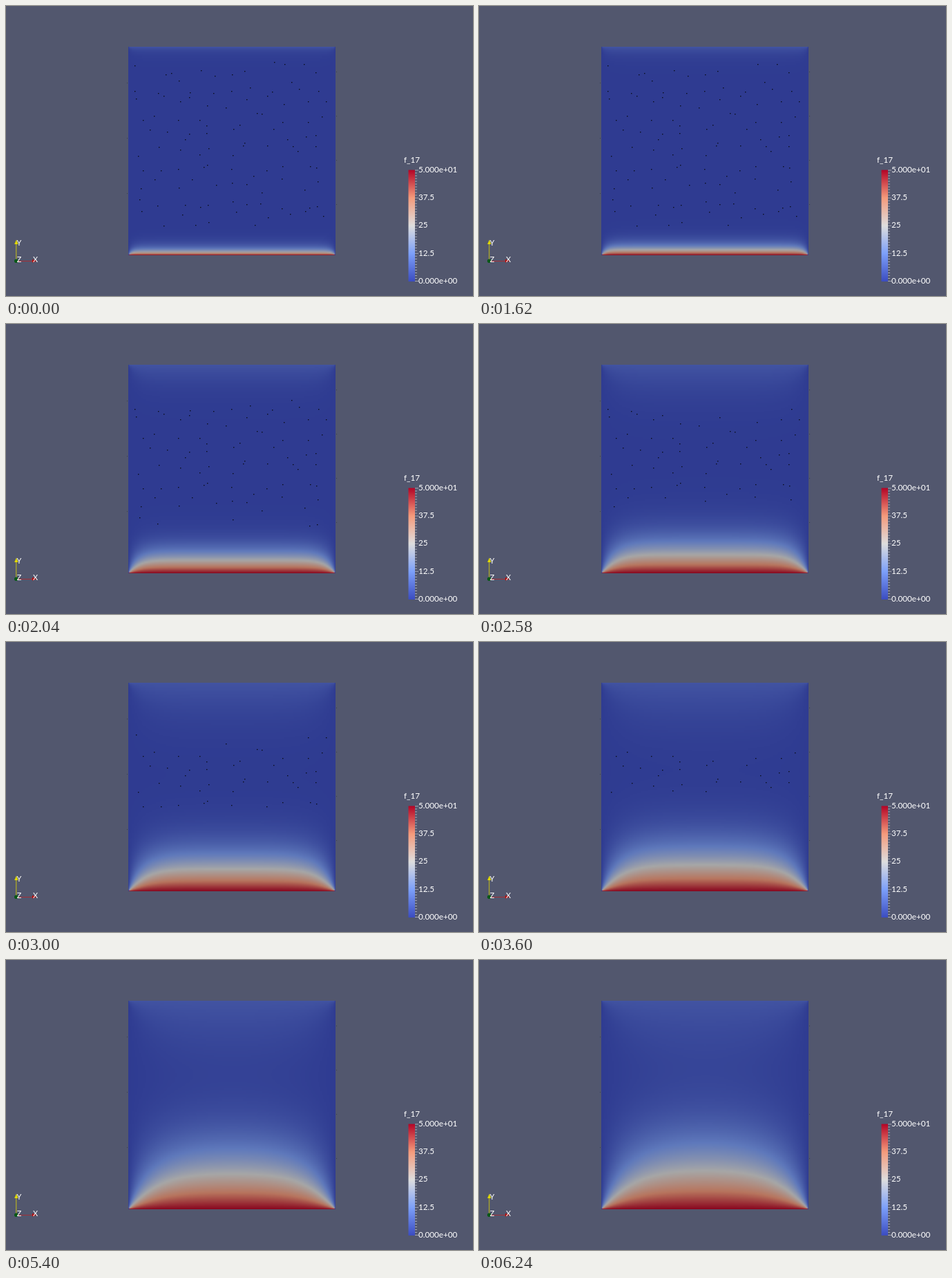
Animation of 676 by 420 pixels, one loop 6.72 s. Source, as an HTML page with a canvas:

```html
<!DOCTYPE html>
<html lang="en">
<head>
<meta charset="utf-8">
<style>
html, body { margin: 0; width: 100%; height: 100%; overflow: hidden; background: #52576e; }
canvas { display: block; }
</style>
</head>
<body>
<canvas id="stage" width="676" height="420"></canvas>
<script>
const LOOP = 6720, HOLD = 1620, STEP = 60, LAST = 78;
const N = 151, DIFFUSION = 11.75, SWEEPS = 20, RELAX = 1.67;
const BOTTOM = 50, TOP = 5;

const ctx = document.getElementById('stage').getContext('2d');

// Cool-to-warm colour map, evenly spaced stops
const STOPS = [[59, 76, 192], [124, 159, 249], [221, 221, 221], [244, 154, 123], [180, 4, 38]];
function coolWarm(f) {
  const p = f * (STOPS.length - 1), i = Math.min(STOPS.length - 2, Math.floor(p));
  return STOPS[i].map((c, k) => c + (STOPS[i + 1][k] - c) * (p - i));
}
const SHADED = Array.from({ length: 501 }, (_, i) => coolWarm(i / 500).map(c => c * 0.74 + 3));

// Heat equation with hot bottom, mild top and cold sides:
// implicit time steps, solved by successive over-relaxation
function simulate() {
  const heat = new Float32Array(N * N);
  heat.fill(TOP, 1, N - 1);
  heat.fill(BOTTOM, (N - 1) * N + 1, N * N - 1);
  const states = [];
  for (let n = 0; n <= LAST; n++) {
    const before = heat.slice();
    for (let s = 0; s < SWEEPS; s++) {
      for (let y = 1; y < N - 1; y++) {
        for (let i = y * N + 1; i < y * N + N - 1; i++) {
          const around = heat[i - 1] + heat[i + 1] + heat[i - N] + heat[i + N];
          const solved = (before[i] + DIFFUSION * around) / (1 + 4 * DIFFUSION);
          heat[i] += RELAX * (solved - heat[i]);
        }
      }
    }
    states.push(heat.slice());
  }
  return states;
}
const states = simulate();

const plate = document.createElement('canvas');
plate.width = plate.height = N;
const plateCtx = plate.getContext('2d');
const pixels = plateCtx.createImageData(N, N);

function drawPlate(n) {
  states[n].forEach((value, i) => {
    const level = Math.max(0, Math.min(500, Math.round(value * 10)));
    pixels.data.set([...SHADED[level], 255], i * 4);
  });
  plateCtx.putImageData(pixels, 0, 0);
  ctx.drawImage(plate, 0.5, 0.5, N - 1, N - 1, 177, 59, 300, 302);
}

// Specks scattered on a jittered grid
let seed = 17;
function jitter(range) {
  seed = seed * 16807 % 2147483647;
  return Math.round((seed / 2147483647 - 0.5) * range);
}
const specks = [];
for (let row = 0; row < 10; row++) {
  for (let col = 0; col < 11; col++) {
    specks.push([197 + col * 26 + jitter(22), 92 + row * 24 + jitter(22)]);
  }
}

// They vanish as the two warm fronts reach them, later near the sides
function drawSpecks(n) {
  const spread = Math.sqrt(n + 1);
  const upper = 59 + 17.1 * spread, lower = 351.5 - 22.4 * spread;
  ctx.fillStyle = '#080a12';
  for (const [x, y] of specks) {
    const lag = Math.min(12, 17 * (1 - n / 80) * (Math.abs(x - 327) / 113) ** 6);
    if (y > upper - lag && y < lower + lag) ctx.fillRect(x, y, 1.4, 1.3);
  }
  ctx.fillStyle = 'rgba(30,40,45,.5)';
  for (let y = 111; y < 290; y += 80) ctx.fillRect(175, y, 1, 1);
  for (let y = 95; y < 290; y += 64) ctx.fillRect(478, y, 1, 1);
}

function label(text, x, y, size = 11.7) {
  ctx.font = size + 'px Lato, sans-serif';
  ctx.fillStyle = '#fff';
  ctx.fillText(text, x, y);
}

function drawLegend() {
  const top = 237.5, height = 161.5;
  const ramp = ctx.createLinearGradient(0, top + height, 0, top);
  for (let i = 0; i <= 16; i++) {
    ramp.addColorStop(i / 16, `rgb(${coolWarm(i / 16).map(Math.round)})`);
  }
  ctx.fillStyle = ramp;
  ctx.fillRect(582.5, top, 9.5, height);
  ctx.fillStyle = 'rgba(255,255,255,.6)';
  for (let i = 0; i <= 40; i++) {
    ctx.fillRect(592, top + i * (height - 1) / 40, i % 10 ? 3 : 5, 0.8);
  }
  label('f_17', 576, 227);
  ['5.000e+01', '37.5', '25', '12.5', '0.000e+00'].forEach((text, i) => label(text, 597, 241 + i * 40.2));
}

function shape(color, ...points) {
  ctx.fillStyle = color;
  ctx.beginPath();
  points.forEach(([x, y]) => ctx.lineTo(x, y));
  ctx.fill();
}

function drawAxes() {
  ctx.fillStyle = '#c8c014';
  ctx.fillRect(14.3, 344, 1, 25);
  shape('#e0d800', [15, 338.5], [17.6, 345], [12.2, 345]);
  ctx.fillStyle = '#a03038';
  ctx.fillRect(15, 369, 25, 1);
  shape('#b01010', [44.5, 369.3], [38, 366.8], [38, 371.8]);
  ctx.fillStyle = '#0a5818';
  ctx.beginPath();
  ctx.arc(14.8, 369.3, 2.8, 0, 7);
  ctx.fill();
  label('Y', 15.5, 346.5, 11);
  label('X', 39, 371, 11);
  label('Z', 15.8, 370.5, 11);
}

let shown = -1;
function render() {
  const t = performance.now() % LOOP;
  const n = Math.max(0, Math.min(LAST, Math.floor((t - HOLD) / STEP) + 1));
  if (n !== shown) {
    shown = n;
    ctx.fillStyle = '#52576e';
    ctx.fillRect(0, 0, 676, 420);
    drawPlate(n);
    drawSpecks(n);
    drawLegend();
    drawAxes();
  }
  requestAnimationFrame(render);
}
render();
</script>
</body>
</html>
```
